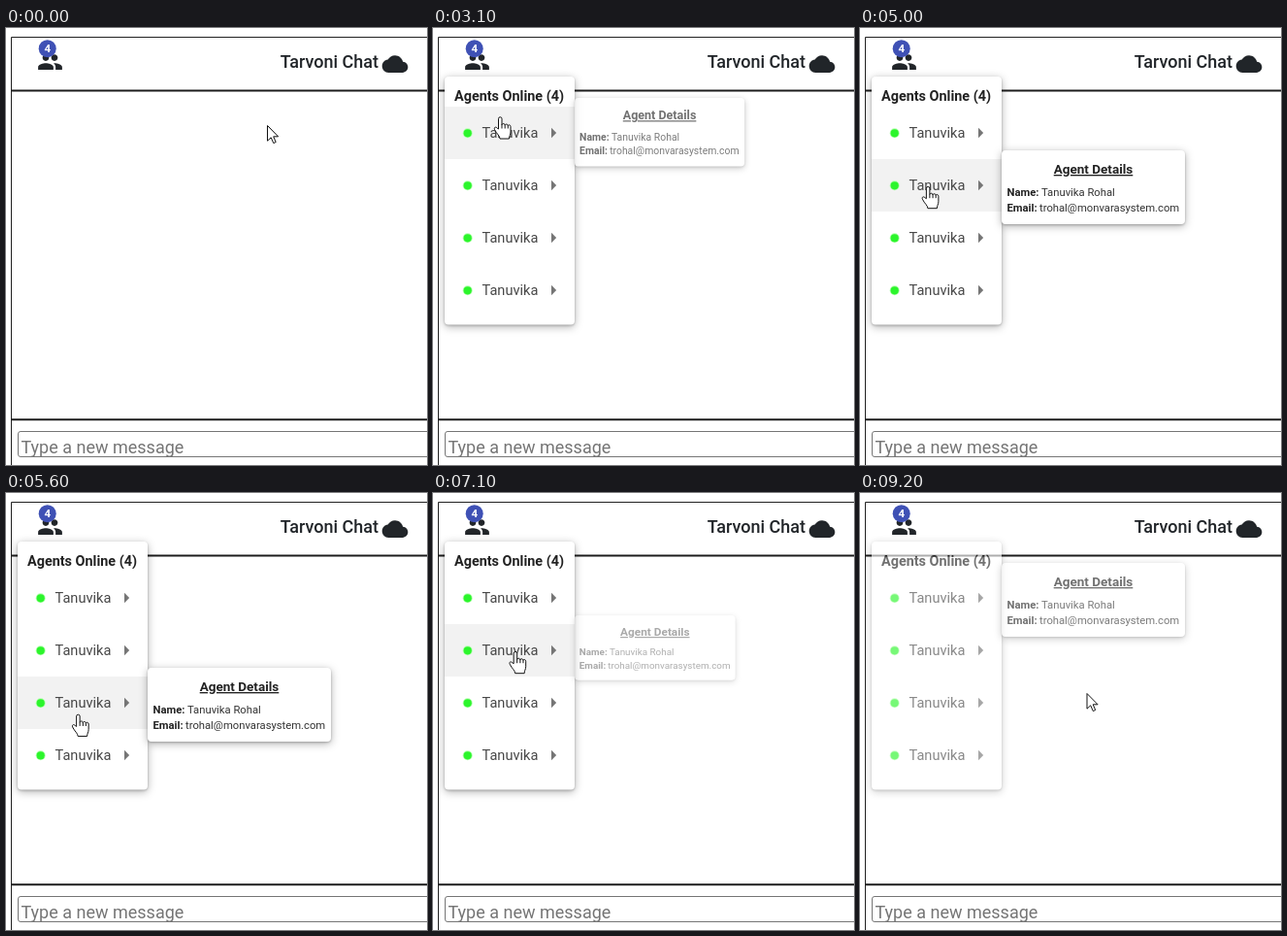
An HTML page for the animation above (9300 ms loop, 434 px wide and 450 px high).

```html
<!DOCTYPE html>
<html lang="en">
<head>
<meta charset="utf-8">
<title>Chat agents menu</title>
<style>
html, body { margin: 0; height: 100%; overflow: hidden; background: #fff; }
svg { display: block; width: 434px; height: 450px; font-family: Roboto, sans-serif; }
.ink { fill: #212529; }
.card { fill: #fff; filter: drop-shadow(0 1px 1px rgba(0,0,0,.22)) drop-shadow(0 2px 4px rgba(0,0,0,.3)); }
.bold { font-weight: 700; fill: #222; }
.item { font-size: 14.6px; fill: #484848; }
.small { font-size: 11.25px; fill: #333; }
.cursor path { fill: #fff; stroke: #111; stroke-linejoin: round; }
</style>
</head>
<body>
<svg viewBox="0 0 434 450">
  <path d="M5.5 450V9.5H434" fill="none" stroke="#222"/>
  <path d="M5 64.5H434M5 403.3H434" stroke="#1c1c1c" stroke-width="1.9"/>
  <rect x="12.5" y="415.5" width="460" height="26" rx="2.5" fill="#fff" stroke="#767676"/>
  <text x="15.5" y="438" font-size="18" fill="#757575">Type a new message</text>

  <rect id="ripple" x="12" y="16" width="67" height="36" rx="4" fill="#e6e6e6"/>
  <path class="ink" transform="translate(32 21.5) scale(1.125)" d="M16 11c1.66 0 2.99-1.34 2.99-3S17.66 5 16 5c-1.66 0-3 1.34-3 3s1.34 3 3 3zm-8 0c1.66 0 2.99-1.34 2.99-3S9.66 5 8 5C6.34 5 5 6.34 5 8s1.34 3 3 3zm0 2c-2.33 0-7 1.17-7 3.5V19h14v-2.5c0-2.33-4.67-3.5-7-3.5zm8 0c-.29 0-.62.02-.97.05 1.16.84 1.97 1.97 1.97 3.45V19h6v-2.5c0-2.33-4.67-3.5-7-3.5z"/>
  <circle cx="42.7" cy="21.2" r="9" fill="#3f51b5"/>
  <text x="42.7" y="25.2" font-size="11.5" font-weight="700" fill="#fff" text-anchor="middle">4</text>
  <text class="ink" x="384" y="41" font-size="18" font-weight="500" text-anchor="end">Tarvoni Chat</text>
  <path class="ink" transform="translate(387.7 23.7) scale(1.11)" d="M19.35 10.04C18.67 6.59 15.64 4 12 4 9.11 4 6.6 5.64 5.35 8.04 2.34 8.36 0 10.91 0 14c0 3.31 2.69 6 6 6h13c2.76 0 5-2.24 5-5 0-2.64-2.05-4.78-4.65-4.96z"/>

  <g id="menu">
    <rect class="card" x="12" y="50" width="134" height="255.5" rx="4"/>
    <rect id="hover" x="12" width="134" height="54" fill="#f2f2f2"/>
    <text class="bold" x="22" y="74.5" font-size="14.4">Agents Online (4)</text>
    <g id="rows"></g>
  </g>
  <g id="panels"></g>

  <g id="cursor" class="cursor">
    <path id="arrow" d="M.5 .5V16.2L4.2 12.8 6.8 18.6 9.2 17.5 6.7 11.8H11.6Z"/>
    <g id="hand">
      <path d="M-2 12V1.5a1.75 1.75 0 013.5 0V8c0-2 3.2-2 3.2.3 0-1.8 3.1-1.6 3.1.5 0-1.5 2.7-1.3 2.7.7V15c0 3-1.5 4-1.5 7H-.5c0-3-3.5-5-5.5-9.5-1-2.4 1.6-3.2 2.8-1.2z"/>
      <path d="M1.5 8v3.5M4.7 8.3v3.2M7.8 8.8v2.7"/>
    </g>
    <path id="beam" d="M-3.5-7.5H-1L0-6.5 1-7.5H3.5M0-6.5V7.5M-3.5 7.5H3.5" style="fill:none"/>
  </g>
</svg>
<script>
const LOOP = 9300, ROW = 54, OPEN = 1530, CLOSE = 9165;
const $ = id => document.getElementById(id);
const clamp = v => Math.max(0, Math.min(1, v));

// cursor stops: time, x, y
const path = [
  [0, 269, 100], [1000, 50, 38], [1200, 45, 32], [2400, 45, 32],
  [3100, 69.5, 92], [3850, 69.5, 92], [4700, 70, 158], [4850, 70, 158],
  [5750, 75, 234], [6100, 76, 267], [6450, 76, 267], [7400, 88, 132],
  [7600, 95.5, 77.5], [7950, 95.5, 77.5], [8600, 233.5, 206], [LOOP, 233.5, 206]
];
// time a row becomes active, row
const hovers = [[2950, 0], [4350, 1], [5250, 2], [5825, 3], [6700, 2], [6980, 1], [7380, 0]];

$('rows').innerHTML = [0, 1, 2, 3].map(i => `<g transform="translate(0 ${i * ROW})">
  <circle cx="35.7" cy="108.3" r="5" fill="#b5ffb0"/><circle cx="35.7" cy="108.3" r="4.1" fill="#2cf52c"/>
  <text class="item" x="50.5" y="112.7">Tanuvika</text>
  <path d="M122 102.8L127.2 108 122 113.2Z" fill="#757575"/></g>`).join('');

$('panels').innerHTML = hovers.map(() => `<g>
  <rect class="card" width="189" height="76" rx="4"/>
  <text class="bold" x="94.5" y="24" font-size="13.5" text-anchor="middle" text-decoration="underline">Agent Details</text>
  <text class="small" y="47"><tspan class="bold" x="5.5">Name:</tspan><tspan x="41">Tanuvika Rohal</tspan></text>
  <text class="small" y="63"><tspan class="bold" x="5.5">Email:</tspan><tspan x="39">trohal@monvarasystem.com</tspan></text>
</g>`).join('');

function show(el, alpha) {
  el.style.display = alpha > 0 ? '' : 'none';
  el.setAttribute('opacity', alpha);
}

// popup grows from 80% while it fades in, and only fades when it leaves
function popup(el, x, y, p, fade) {
  const s = .8 + .2 * p;
  el.setAttribute('transform', `translate(${x} ${y}) scale(${s})`);
  show(el, p * fade);
}

function cursorAt(t) {
  const i = path.findIndex(k => k[0] > t);
  const [t0, x0, y0] = path[i - 1], [t1, x1, y1] = path[i];
  const p = (t - t0) / (t1 - t0), e = p * p * (3 - 2 * p);
  return [x0 + (x1 - x0) * e, y0 + (y1 - y0) * e];
}

function cursorKind(t, x, y) {
  if (t < OPEN) return x < 79 && y < 52 ? 'hand' : 'arrow';
  if (x < 12 || x > 146 || y < 50 || y > 297) return 'arrow';
  if (y > 81) return 'hand';
  return y > 60 && x > 22 && x < 135 ? 'beam' : 'arrow';
}

function draw(t) {
  const closing = 1 - clamp((t - CLOSE) / 100);
  const p = clamp((t - OPEN + 60) / 120), s = .8 + .2 * p;
  $('menu').setAttribute('transform', `translate(${12 * (1 - s)} ${50 * (1 - s)}) scale(${s})`);
  show($('menu'), p * closing);
  show($('ripple'), clamp((t - 1450) / 100) * clamp((2350 - t) / 500));

  const active = hovers.filter(h => h[0] <= t).pop();
  show($('hover'), active && t < 9100 ? 1 : 0);
  if (active) $('hover').setAttribute('y', 81 + active[1] * ROW);

  hovers.forEach(([start, row], i) => {
    const end = hovers[i + 1] ? hovers[i + 1][0] : CLOSE;
    popup($('panels').children[i], 146, 72 + row * ROW,
      clamp((t - start - 75) / 120), 1 - clamp((t - end) / 100));
  });

  const [x, y] = cursorAt(t), kind = cursorKind(t, x, y);
  $('cursor').setAttribute('transform', `translate(${x} ${y})`);
  for (const id of ['arrow', 'hand', 'beam']) show($(id), id === kind ? 1 : 0);
}

const began = performance.now();
function tick() {
  draw((performance.now() - began) % LOOP);
  requestAnimationFrame(tick);
}
tick();
</script>
</body>
</html>
```
